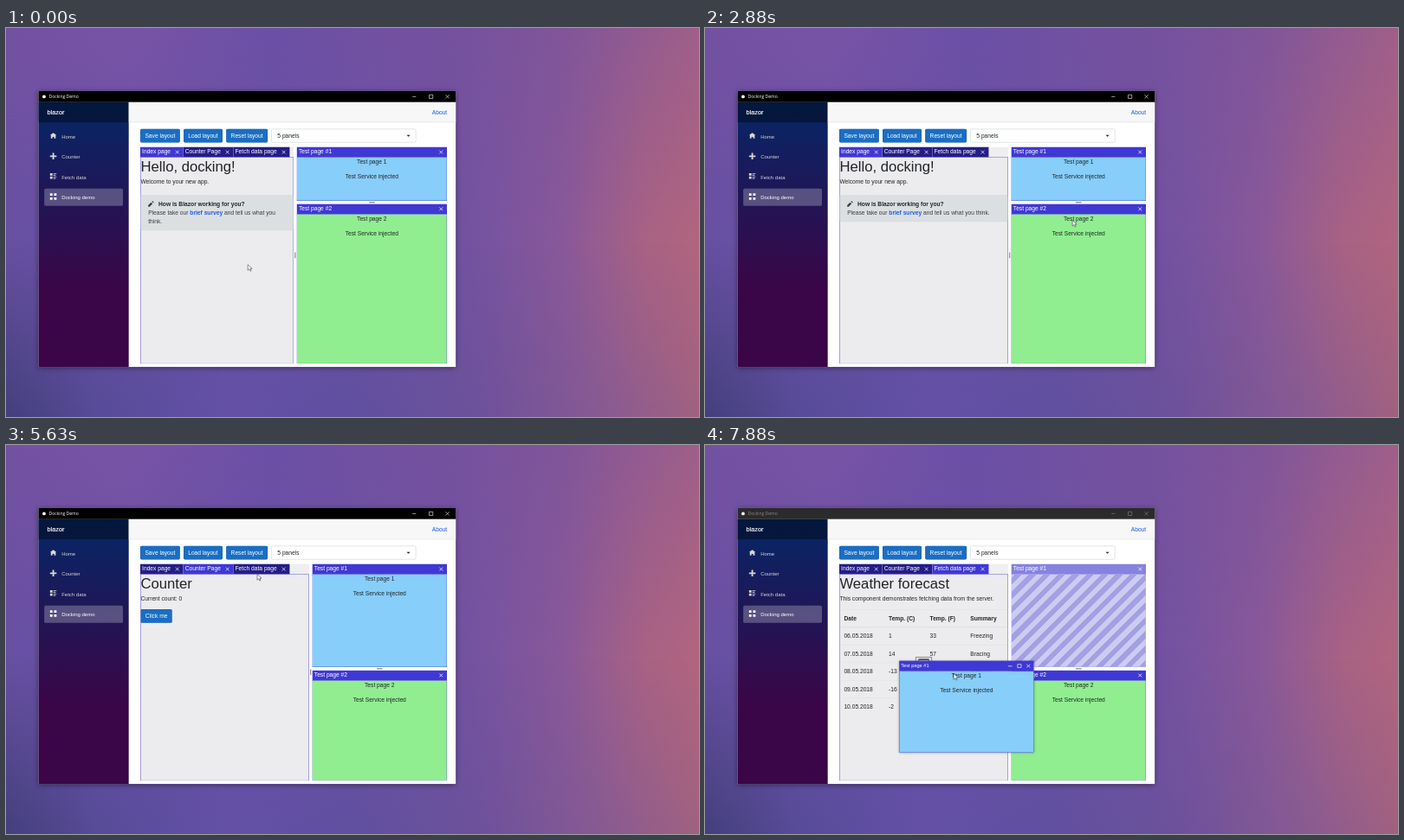
These frames come from a looping animation (800 by 450 pixels, 8 s). An HTML page:

```html
<!DOCTYPE html>
<html lang="en">
<head>
<meta charset="utf-8">
<title>Docking Demo</title>
<style>
* { box-sizing: border-box; }
html, body { margin: 0; width: 100%; height: 100%; overflow: hidden; }
:root { --accent: #4038d4; --dark: #241d86; }
#stage {
  position: absolute; left: 0; top: 0; width: 1920px; height: 1080px; overflow: hidden;
  transform: scale(.4166667); transform-origin: 0 0;
  font: 16px/24px "Liberation Sans", Arial, sans-serif; color: #212529;
}
#stage div { position: absolute; }
.sky { inset: 0; }
.sky.top { background: linear-gradient(90deg, #7451a2, #7854a6 18%, #6b50a5 38%, #74519f 62%, #80559a 80%, #a05f8a); }
.sky.mid {
  background: linear-gradient(90deg, #6750a2, #6a51a6 40%, #7252a1 66%, #88589a 80%, #a86284 92%, #b1657e);
  mask-image: linear-gradient(transparent, #000 55%);
}
.sky.low {
  background: linear-gradient(90deg, #443f7c, #574b97 13%, #6351a6 32%, #5f509f 50%, #6d519b 68%, #875a92 86%, #a06180);
  mask-image: linear-gradient(transparent 55%, #000);
}
#win { left: 90px; top: 175px; width: 1156px; height: 766px; background: #fff; box-shadow: 0 2px 14px rgba(0,0,0,.5); }
#bar { left: 0; top: 0; width: 100%; height: 31px; background: #000; color: #fff; font: 12px/31px "Open Sans", sans-serif; }
#bar.idle { background: #2b2b2b; color: #8a8a8a; }
#bar span { position: absolute; left: 29px; }
#bar i { position: absolute; left: 11px; top: 11px; width: 9px; height: 9px; border-radius: 50%; background: #fff; }
#bar svg { position: absolute; right: 0; top: 0; }
svg { fill: currentColor; overflow: visible; }
.line { fill: none; stroke: currentColor; }
#side { left: 0; top: 31px; width: 250px; bottom: 0; background: linear-gradient(rgb(5,39,103), #3a0647 70%); color: #d7d7d7; }
#brand { left: 0; top: 0; width: 100%; height: 56px; padding-left: 24px; background: rgba(0,0,0,.4); color: #fff; font-size: 17.6px; line-height: 56px; -webkit-text-stroke: .4px #fff; }
.nav { left: 16px; width: 218px; height: 48px; padding-left: 48px; border-radius: 4px; font-size: 14.4px; line-height: 48px; }
.nav svg { position: absolute; left: 16px; top: 13px; }
.nav.on { background: rgba(255,255,255,.25); color: #fff; }
#head { left: 250px; right: 0; top: 31px; height: 56px; background: #f7f7f7; border-bottom: 1px solid #d6d5d5; text-align: right; padding-right: 24px; line-height: 55px; }
.link { color: #1a5cee; }
.btn { height: 38px; padding: 0 13px; border-radius: 4px; background: #1b6ec2; box-shadow: inset 0 0 0 1px #1861ac; color: #fff; line-height: 38px; white-space: nowrap; }
#win > .btn { top: 105px; }
#pick { left: 645px; top: 105px; width: 401px; height: 38px; border: 1px solid #b9bfc6; border-radius: 4px; padding-left: 16px; line-height: 36px; }
#pick svg { position: absolute; right: 15px; top: 16px; }
.pane { overflow: hidden; }
.cap { left: 0; top: 0; width: 100%; height: 29px; padding-left: 6px; background: var(--accent); color: #fff; line-height: 28px; white-space: nowrap; }
.cap svg { position: absolute; right: 11px; top: 9px; }
.body { left: 0; top: 29px; width: 100%; bottom: 0; border: 1px solid var(--accent); overflow: hidden; }
.blue { background: #87cefa; }
.green { background: #90ee90; }
.center { text-align: center; }
p { margin: 0 0 16px; }
h1 { margin: 0 0 8px; font-size: 40px; line-height: 48px; font-weight: 400; white-space: nowrap; }
#left .body { background: #ecebed; }
#tabs { left: 0; top: 0; width: 100%; height: 29px; display: flex; background: #efeff1; }
#stage .tab { position: relative; flex: 0 1 auto; min-width: 0; padding: 0 34px 0 5px; border-right: 1px solid #aaa7e4; background: var(--dark); color: #fff; line-height: 28px; }
#stage .tab.on { background: var(--accent); }
.tab span { display: block; overflow: hidden; text-overflow: ellipsis; white-space: nowrap; }
.tab svg { position: absolute; right: 10px; top: 9px; }
#stage .page { position: relative; display: none; }
#stage .page.on { display: block; }
#stage .page .btn { position: relative; display: inline-block; }
#stage .note { position: relative; margin-top: 24px; padding: 12px 20px; border: 1px solid #d3d6d9; border-radius: 4px; background: #dcdfe1; color: #383d41; }
.note svg { margin-right: 8px; vertical-align: -2px; }
.note b { color: #212529; }
.note .link { color: #1a5cee; font-weight: 700; }
table { width: 100%; table-layout: fixed; border-collapse: collapse; white-space: nowrap; }
th, td { padding: 12px; text-align: left; border-top: 1px solid #dadde1; }
th { border-bottom: 2px solid #dadde1; }
.ghost .cap { background: #8782e0; }
.ghost .body { background: repeating-linear-gradient(-45deg, #a3a0e3 0 14.14px, #cccbf1 14.14px 28.28px); border-color: #8782e0; }
.ghost p { display: none; }
.split { background: #fff; }
.split.hot { background: var(--accent); }
.split svg { position: absolute; left: 50%; top: 50%; color: #8f8f96; }
.split.hot svg { display: none; }
#dock { width: 116px; height: 116px; }
#float { width: 373px; height: 255px; box-shadow: 0 1px 6px rgba(0,0,0,.35); }
#float .cap { font-size: 13.6px; padding-left: 5px; }
#float .cap svg { top: 9px; right: 9px; }
#cursor { color: #fff; }
</style>
</head>
<body>
<div id="stage">
  <div class="sky top"></div><div class="sky mid"></div><div class="sky low"></div>
  <div id="win">
    <div id="bar"><i></i><span>Docking Demo</span>
      <svg class="line" width="138" height="31"><path d="M18 15.5h10M64.5 10.5h10v10h-10zM110 10.5l10 10m0-10l-10 10" stroke-width="1.4"/></svg>
    </div>
    <div id="side"><div id="brand">blazor</div></div>
    <div id="head"><span class="link">About</span></div>
    <div class="btn" style="left:282px">Save layout</div>
    <div class="btn" style="left:401.5px">Load layout</div>
    <div class="btn" style="left:520px">Reset layout</div>
    <div id="pick">5 panels<svg width="10" height="5"><path d="M0 0h10l-5 5z"/></svg></div>
  </div>
  <div id="left" class="pane">
    <div id="tabs"></div>
    <div class="body">
      <div class="page">
        <h1>Hello, docking!</h1><p>Welcome to your new app.</p>
        <div class="note"><svg width="16" height="16" viewBox="0 0 8 8"><path d="M6 0l-1 1 2 2 1-1-2-2zm-2 2l-4 4v2h2l4-4-2-2z"/></svg>
          <b>How is Blazor working for you?</b><br>Please take our <span class="link">brief survey</span> and tell us what you think.</div>
      </div>
      <div class="page"><h1>Counter</h1><p>Current count: 0</p><div class="btn">Click me</div></div>
      <div class="page"><h1>Weather forecast</h1><p>This component demonstrates fetching data from the server.</p>
        <table><colgroup><col style="width:124px"><col style="width:114px"><col style="width:112px"><col></colgroup><tbody id="rows"></tbody></table></div>
    </div>
  </div>
  <div id="one" class="pane"><div class="cap">Test page #1</div><div class="body blue center"><p>Test page 1</p><p>Test Service injected</p></div></div>
  <div id="two" class="pane"><div class="cap">Test page #2</div><div class="body green center"><p>Test page 2</p><p>Test Service injected</p></div></div>
  <div id="vbar" class="split"><svg width="1" height="1"><path d="M-1.5-8h3v16h-3z"/></svg></div>
  <div id="hbar" class="split"><svg width="1" height="1"><path d="M-8-1.5h16v3h-16z"/></svg></div>
  <div id="dock"><svg width="116" height="116" viewBox="-58 -58 116 116">
    <path d="M-22-57h44v27l8 8h27v44h-27l-8 8v27h-44v-27l-8-8h-27v-44h27l8-8z" fill="#e6e5e8" stroke="#77777c" stroke-width="2"/>
    <path d="M-15-15h30v30h-30z" fill="#f2f2f4" stroke="#505055" stroke-width="2.5"/>
    <path d="M-15-12h30" stroke="#505055" stroke-width="4"/>
    <g id="arms"></g>
  </svg></div>
  <div id="float"><div class="cap">Test page #1<svg class="line" width="62" height="11"><path d="M0 6h11M26 1h10v9h-10zM51 1l10 9m0-9l-10 9" stroke-width="1.6"/></svg></div>
    <div class="body blue center"><p>Test page 1</p><p>Test Service injected</p></div></div>
  <div id="cursor"><svg width="1" height="1"><path id="shape" stroke="#222" stroke-width="1.2"/></svg></div>
</div>
<script>
const $ = id => document.getElementById(id);
const L = 372, T = 330, R = 1222, B = 932, GAP = 8, K = 2.4;
const LOOP = 8000, STEP = 125, FLOAT_AT = 6875;

const cross = '<svg class="line" width="11" height="11"><path d="M1 1l9 9m0-9l-9 9" stroke-width="1.8"/></svg>';
const square = (x, y) => `M${x} ${y}v3h3v-3z`;
const menu = [
  ['Home', 'M4 0l-4 3h1v4h2v-2h2v2h2v-4l1 0z'],
  ['Counter', 'M3 0v3h-3v2h3v3h2v-3h3v-2h-3v-3z'],
  ['Fetch data', square(0, 0) + square(0, 4) + 'M4 0h4v1h-4zm0 2h3v1h-3zm0 2h4v1h-4zm0 2h3v1h-3z'],
  ['Docking demo', square(0, 0) + square(5, 0) + square(0, 5) + square(5, 5)]
];
menu.forEach(([name, d], i) => $('side').insertAdjacentHTML('beforeend',
  `<div class="nav ${i == 3 ? 'on' : ''}" style="top:${72 + 56 * i}px"><svg width="18" height="18" viewBox="0 0 8 8"><path d="${d}"/></svg>${name}</div>`));

$('tabs').innerHTML = ['Index page', 'Counter Page', 'Fetch data page']
  .map(s => `<div class="tab"><span>${s}</span>${cross}</div>`).join('');
for (const id of ['one', 'two']) $(id).firstChild.insertAdjacentHTML('beforeend', cross);

const row = (cells, tag) => '<tr>' + cells.map(c => `<${tag}>${c}</${tag}>`).join('') + '</tr>';
$('rows').innerHTML = row(['Date', 'Temp. (C)', 'Temp. (F)', 'Summary'], 'th') + [
  ['06', 1, 33, 'Freezing'], ['07', 14, 57, 'Bracing'], ['08', -13, 9, 'Freezing'],
  ['09', -16, 4, 'Balmy'], ['10', -2, 29, 'Chilly']
].map(([day, ...rest]) => row([day + '.05.2018', ...rest], 'td')).join('');

$('arms').innerHTML = [0, 1, 2, 3].map(i => {
  const side = i % 2 ? 'M-13-51h26v15h-26z' : 'M-14-51h28v15h-28z';
  return `<g transform="rotate(${90 * i})"><path d="${side}" fill="#f4f4f6" stroke="#505055" stroke-width="2"/>
    <path d="M-14-50h28" stroke="#505055" stroke-width="4"/><path d="M-5-26h10l-5-6z" fill="#333"/></g>`;
}).join('');

// Each track lists [time, value...]; values ease between entries.
const mouse = [[0, 279, 267], [125, 281, 267], [875, 333, 262], [1000, 333, 262], [1500, 297, 260], [1625, 295, 260],
  [2500, 351, 262], [2625, 351, 262], [2875, 424, 216], [3250, 430, 202], [3375, 430, 202], [3875, 430, 259],
  [4000, 430, 259], [4375, 256, 160], [4625, 225, 145], [5125, 225, 145], [5625, 290, 143], [5750, 290, 143],
  [6375, 417, 145], [6750, 417, 145], [7375, 342, 202], [7875, 287, 258]];
const column = [[1000, 797], [1500, 716], [1625, 711], [2500, 840]];
const middle = [[3375, 480], [3875, 617]];

function at(track, t) {
  const i = track.findIndex(k => k[0] > t);
  if (i < 0) return track[track.length - 1].slice(1);
  if (!i) return track[0].slice(1);
  const a = track[i - 1], b = track[i], u = (t - a[0]) / (b[0] - a[0]), s = u * u * (3 - 2 * u);
  return a.slice(1).map((v, j) => v + (b[j + 1] - v) * s);
}
function place(id, x, y, w, h) {
  const s = $(id).style;
  s.left = x + 'px';
  s.top = y + 'px';
  if (w) { s.width = w + 'px'; s.height = h + 'px'; }
}
const show = (id, on) => { $(id).style.display = on ? '' : 'none'; };
const within = (t, a, b) => t >= a && t < b;

const ARROW = 'M0 0v16l4-4 3 6 2.5-1-2.6-6h5.1z';
const RESIZE = 'M-2-8h1.5v5.5h-5v-3l-5.5 5.5 5.5 5.5v-3h5v5.5h3v-5.5h5v3l5.5-5.5-5.5-5.5v3h-5v-5.5z';

function draw(t) {
  const [mx, my] = at(mouse, t).map(v => v * K);
  const [x] = at(column, t), [y] = at(middle, t);
  const right = x + GAP;
  place('left', L, T, x - L, B - T);
  place('one', right, T, R - right, y - T);
  place('two', right, y + GAP, R - right, B - y - GAP);
  place('vbar', x, T, GAP, B - T);
  place('hbar', right, y, R - right, GAP);

  const wide = within(t, 875, 2625), tall = within(t, 3250, 4000);
  $('vbar').classList.toggle('hot', within(t, 1000, 2625));
  $('hbar').classList.toggle('hot', within(t, 3375, 4000));

  const tab = t < 5000 ? 0 : t < 5750 ? 1 : 2;
  for (const kind of ['.tab', '.page'])
    document.querySelectorAll(kind).forEach((e, i) => e.classList.toggle('on', i == tab));

  const floating = t >= FLOAT_AT;
  $('bar').classList.toggle('idle', floating);
  $('one').classList.toggle('ghost', floating);
  show('float', floating);
  show('dock', floating && mx < x);
  place('float', mx - 151, my - 20);
  place('dock', (L + x) / 2 - 58, (T + 29 + B) / 2 - 58);

  place('cursor', mx, my);
  $('shape').setAttribute('d', wide || tall ? RESIZE : ARROW);
  $('shape').setAttribute('transform', tall ? 'rotate(90)' : '');
}

const start = performance.now();
function tick() {
  const t = (performance.now() - start) % LOOP;
  draw(Math.floor(t / STEP) * STEP);
  requestAnimationFrame(tick);
}
tick();
</script>
</body>
</html>
```
